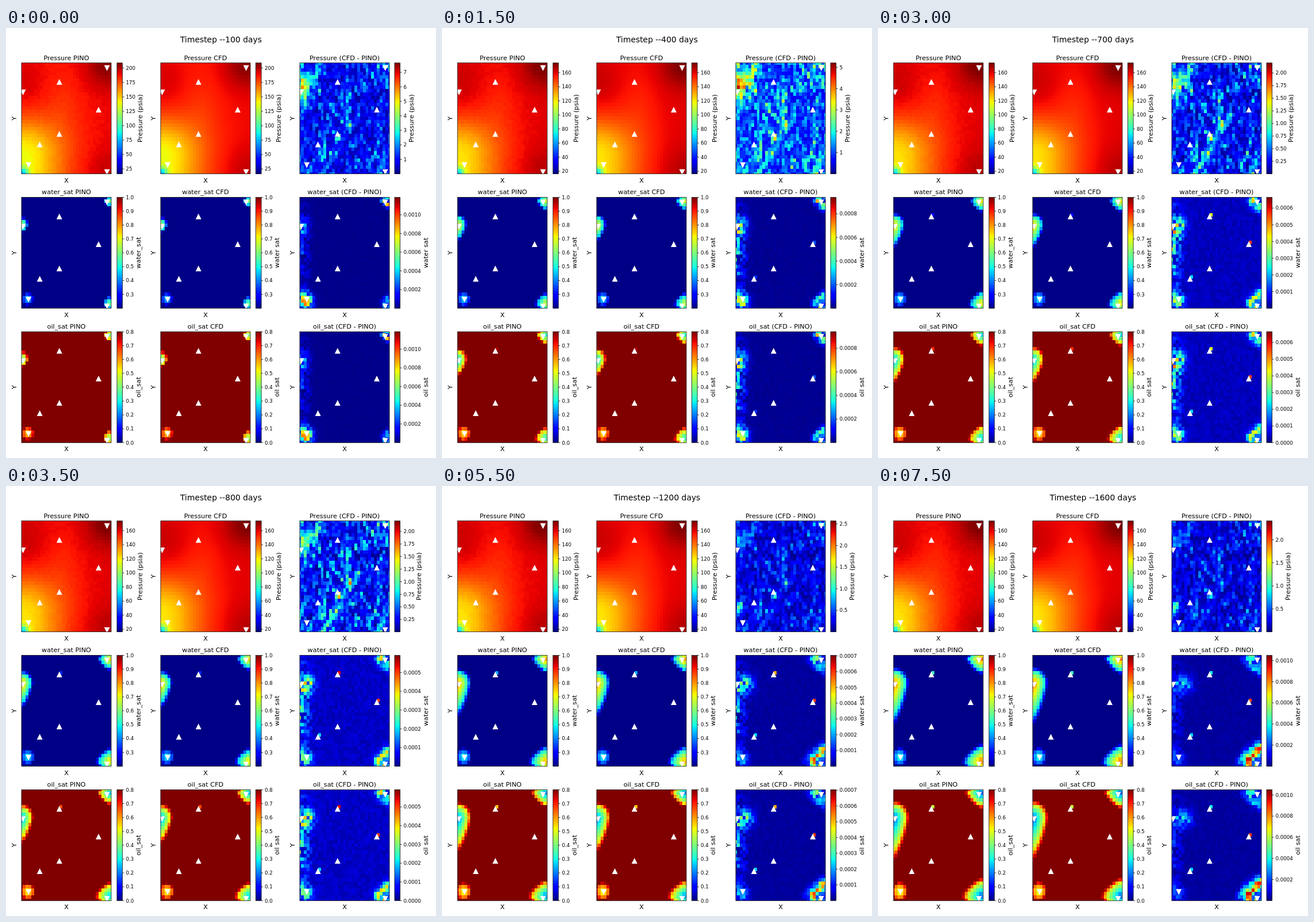
An HTML page with a canvas that plays this animation: 748 px wide and 748 px high, repeating every 8000 ms.

```html
<!DOCTYPE html>
<html lang="en">
<head>
<meta charset="utf-8">
<title>Reservoir timesteps</title>
<style>
html, body { margin: 0; width: 100%; height: 100%; overflow: hidden; background: #fff; }
canvas, svg { position: absolute; left: 0; top: 0; width: 748px; height: 748px; }
text { font-family: "DejaVu Sans", sans-serif; font-size: 11.27px; fill: #000; }
.tick { font-size: 8.67px; }
.head { font-size: 13.87px; }
.mid { text-anchor: middle; }
.frame { fill: none; stroke: #000; stroke-width: .75; }
</style>
</head>
<body>
<canvas id="fields" width="748" height="748"></canvas>
<svg id="marks" viewBox="0 0 748 748"></svg>
<script>
const STEP = 500, STEPS = 16;
const W = 156, H = 193, N = 32, BAR_W = 9.6;
const COLS = [0, 1, 2].map(c => 27 + 242 * c);
const BARS = [0, 1, 2].map(c => 193 + 241.5 * c);
const ROWS = [0, 1, 2].map(r => 60.7 + 233.8 * r);
const ctx = document.getElementById("fields").getContext("2d");
const svg = document.getElementById("marks");

const clamp = v => Math.min(1, Math.max(0, v));
const bell = v => Math.exp(-v * v);
const blob = (x, y, size) => bell(Math.hypot(x, y) / size);
const rnd = (a, b, c) => {
  const s = Math.sin(a * 127.1 + b * 311.7 + c * 74.7) * 43758.5453;
  return s - Math.floor(s);
};

function jet(f) {
  f = clamp(f);
  const r = f < .66 ? (f - .35) / .31 : f < .89 ? 1 : 1 - (f - .89) / .22;
  const g = f < .375 ? (f - .125) / .25 : f < .64 ? 1 : (.91 - f) / .27;
  const b = f < .11 ? .5 + f / .22 : f < .34 ? 1 : (.65 - f) / .31;
  return `rgb(${[r, g, b].map(v => Math.round(clamp(v) * 255))})`;
}

// Top of the error scales at key steps: [step, value]
const PEAK_P = [[0, 7.65], [2, 6.73], [4, 3.68], [6, 2.2], [7, 2.21], [9, 2.54], [13, 2.6], [15, 2.41]];
const PEAK_S = [[0, 11.87], [2, 10.7], [4, 8.1], [7, 5.92], [9, 6.54], [13, 7.53], [15, 10.5]];
function along(keys, i) {
  const n = Math.max(1, keys.findIndex(([s]) => s >= i));
  const [[s0, v0], [s1, v1]] = [keys[n - 1], keys[n]];
  return v0 + (v1 - v0) * (i - s0) / (s1 - s0);
}

// Fields: x, y in pixels inside the panel, c, r the cell; values 0..1 on the colour scale
function pressure(i, x, y, c, r, rough) {
  let f = .895 + .02 * x / W;
  f -= .23 * bell(x / 71) * bell(Math.min(0, y - 162) / 65);
  f += .045 * bell(x / 40) * bell((y - 40) / 60);
  f -= .025 * bell((x - 75) / 30) * bell((y - 80) / 60);
  f += .09 * blob(x - 150, y - 5, 38) + .045 * blob(x - 156, y - 193, 45);
  f -= .38 * blob(x - 1, y - 192, 10);
  if (!i) f -= .012 + .02 * blob(x - 15, y - 160, 60);
  return f + rough * (rnd(c, r, 5) - .5) * .011;
}

const dist = (dx, dy, rx, ry, p) =>
  ((Math.abs(dx) / rx) ** p + (Math.abs(dy) / ry) ** p) ** (1 / p);

// Flooded zones around the injectors: [distance, strength]
function plumes(i, x, y) {
  const k = i / 15, g = k ** .7, below = y > 48;
  return {
    well: [dist(x - 1, y - 48, 11 + 15 * g, 14 + (below ? 62 * k ** .85 : 14 * g), below ? 1.3 : 2), .7 + .15 * g],
    topRight: [dist(x - 153, y - 6, 11 + 17 * g, 12 + 16 * g, 1.3), .62 + .23 * g],
    lowRight: [dist(x - 153, y - 185, 12 + 22 * g, 14 + 18 * g, 1.3), .6 + .24 * g],
    corner: [dist(x - 11, y - 177, 11 + 3 * g, 12 + 5 * g, 1.7), .36 + .1 * g]
  };
}
function water(i, x, y, c, r) {
  let w = 0;
  for (const [d, amp] of Object.values(plumes(i, x, y)))
    if (d < 1) w = Math.max(w, amp * (1 - .72 * d ** .9) * Math.min(1, 4 * (1 - d)));
  if (c === 14 && r === 27) w = clamp((i - 2) / 13) * .42;
  return w;
}

function pressureGap(i, x, y, c, r) {
  const pair = Math.floor((r + c % 2) / 2);
  const n = .55 * rnd(c, pair, 1) + .3 * rnd(c, r, 2) + .15 * rnd(c, r, 20 + i);
  const early = bell((i - 2) / 1.6);
  const mean = .12 + .19 * early + .06 * bell((i - 7) / 2);
  const even = .05 + .4 * early;
  const wave = 1 + .25 * Math.sin(x / 19 + 1) * Math.cos(y / 31);
  let v = mean * wave * (even + (1 - even) * 3 * n * n);
  v += (.04 + .42 * bell(i / 8)) * bell(x / 15) * bell((y - 48) / 28) * (.6 + .8 * n);
  v += .28 * bell((i - 4) / 3) * n * bell((x - 25) / 25) * bell((y - 30) / 38);
  const t = clamp((y - 87) / 20) && (y - 87) / 106;
  if (t) v += (.06 + .18 * bell((i - 6) / 3)) * bell((x - 101 + 54 * t) / 12) * (.3 + 1.2 * n);
  v += .45 * clamp((i - 6) / 3) * bell((x - 8) / 5) * bell((y - 150) / 9) * (.6 + .8 * n);
  v += .3 * rnd(c, r, 8) * (blob(x - 13, y - 189, 8) + blob(x - 154, y - 4, 10));
  return v;
}

function satGap(i, x, y, c, r) {
  if (c === 14 && r === 27) return clamp((i - 4) / 3) * (.92 - .55 * clamp((i - 9) / 6));
  if (c === 28 && r === 19) return clamp((i - 2) / 4) * .85;
  if (c === 7 && r === 9) return clamp((i - 2) / 2) * .33;
  const k = i / 15, n = .8 * rnd(c, r, 3) + .2 * rnd(c, r, 40 + i);
  const swell = Math.sin(Math.PI * k ** .7);
  const p = plumes(i, x, y);
  const front = name => bell((p[name][0] - .65) / .38) * (.35 + 1.3 * n);
  let v = (.01 + .045 * bell((i - 7) / 2.5) + .018 * k) * (.55 + .8 * n);
  v += (.5 - .17 * k) * front("topRight") + (.3 + .35 * k) * front("lowRight");
  v += (.2 + .6 * (1 - k) ** 1.5) * bell(dist(x - 9, y - 181, 11, 13, 2.4)) * (.3 + 1.4 * n);
  v += (.28 + .2 * swell) * bell(dist(x - 5 - i, y - 50, 9 + i / 2, 14, 2)) * (.2 + 1.3 * n);
  v += (.17 + .24 * swell) * bell(x / 15) * bell((y - 90) / 65) * 1.6 * n * n;
  return v;
}

function paint(col, row, field) {
  const dx = W / N, dy = H / N;
  ctx.save();
  ctx.beginPath();
  ctx.rect(COLS[col], ROWS[row], W, H);
  ctx.clip();
  for (let c = 0; c <= N; c++) for (let r = 0; r <= N; r++) {
    const x = c * dx, y = (N - r) * dy;
    const [x0, x1] = [-.5, .5].map(s => Math.round(COLS[col] + x + s * dx));
    const [y0, y1] = [-.5, .5].map(s => Math.round(ROWS[row] + y + s * dy));
    ctx.fillStyle = jet(field(x, y, c, r));
    ctx.fillRect(x0, y0, x1 - x0, y1 - y0);
  }
  ctx.restore();
}

const text = (x, y, s, cls = "mid", turn = false) =>
  `<text class="${cls}" x="${x}" y="${y}"${turn ? ` transform="rotate(-90 ${x} ${y})"` : ""}>${s}</text>`;
const box = (x, y, w) => `<rect class="frame" x="${x}" y="${y}" width="${w}" height="${H}"/>`;

// Frames, titles and wells, the same at every step
function still() {
  const producers = [[13.5, 26.5], [27.5, 18.5], [13.5, 11.5], [6.5, 8.5]];
  const injectors = [[.5, 23.5], [30.5, 30.5], [30.5, .5], [2.5, 2.5]];
  const names = ["Pressure", "water_sat", "oil_sat"];
  const tails = [" PINO", " CFD", " (CFD - PINO)"];
  let out = "";
  ROWS.forEach((y, r) => COLS.forEach((x, c) => {
    const id = `p${r}${c}`;
    const tri = s => ([a, b]) =>
      `M${x + a * W / N} ${y + H - b * H / N - 5 * s}l5 ${10 * s}h-10z`;
    const wells = [...producers.map(tri(1)), ...injectors.map(tri(-1))].join("");
    out += `<clipPath id="${id}"><rect x="${x}" y="${y}" width="${W}" height="${H}"/></clipPath>` +
      `<path clip-path="url(#${id})" fill="#fff" d="${wells}"/>` +
      box(x, y, W) + box(BARS[c], y, BAR_W) +
      text(x + W / 2, y - 5.2, names[r] + tails[c]) +
      text(x + W / 2, y + H + 15, "X") +
      text(x - 9.2, y + H / 2, "Y", "mid", true);
  }));
  return out;
}

function scale(row, col, lo, hi, step, digits, label) {
  const x = BARS[col] + BAR_W, top = ROWS[row];
  let out = "", longest = 0;
  for (let k = Math.ceil(lo / step); k * step <= hi * 1.0001; k++) {
    const y = top + H * (1 - (k * step - lo) / (hi - lo));
    const s = (k * step).toFixed(digits);
    longest = Math.max(longest, s.length);
    out += `<path class="frame" d="M${x} ${y}h3"/>` + text(x + 5.8, y + 3.2, s, "tick");
  }
  const wide = longest * 5.51 - (digits ? 2.75 : 0);
  return out + text(x + 17.6 + wide, top + H / 2, label, "mid", true);
}

function scales(i) {
  const psia = "Pressure (psia)";
  const pp = along(PEAK_P, i), ps = along(PEAK_S, i) / 1e4;
  const calm = pp < 2.25;
  const [stepP, digits] = pp > 4 ? [1, 0] : calm ? [.25, 2] : [.5, 1];
  const stepS = ps > 9e-4 ? 2e-4 : 1e-4;
  let out = "";
  for (const c of [0, 1]) {
    const gap = c ? " " : "_";
    out += (i ? scale(0, c, 16.3, 173.9, 20, 0, psia) : scale(0, c, 16.5, 209, 25, 0, psia)) +
      scale(1, c, .2002, 1, .1, 1, `water${gap}sat`) +
      scale(2, c, 0, .8, .1, 1, `oil${gap}sat`);
  }
  return out + scale(0, 2, .002, pp, stepP, digits, psia) +
    scale(1, 2, 1e-7, ps, stepS, 4, "water sat") +
    scale(2, 2, calm ? 0 : 1e-7, ps, stepS, 4, "oil sat");
}

function draw(i) {
  ctx.fillStyle = "#fff";
  ctx.fillRect(0, 0, 748, 748);
  for (const c of [0, 1]) {
    paint(c, 0, (...cell) => pressure(i, ...cell, 1 - c));
    paint(c, 1, (...cell) => Math.max(.006, water(i, ...cell)));
    paint(c, 2, (...cell) => 1 - water(i, ...cell));
  }
  paint(2, 0, (...cell) => pressureGap(i, ...cell));
  for (const row of [1, 2]) paint(2, row, (...cell) => satGap(i, ...cell));
  for (const x of BARS) for (const y of ROWS) for (let k = 0; k < H; k++) {
    ctx.fillStyle = jet(1 - k / (H - 1));
    ctx.fillRect(x, Math.round(y) + k, BAR_W, 1);
  }
  svg.innerHTML = fixed + scales(i) +
    text(374, 25, `Timestep --${(i + 1) * 100} days`, "head mid");
}

const fixed = still();
const start = performance.now();
let shown = -1;
function tick() {
  const i = Math.floor((performance.now() - start) / STEP) % STEPS;
  if (i !== shown) draw(shown = i);
  requestAnimationFrame(tick);
}
tick();
</script>
</body>
</html>
```
